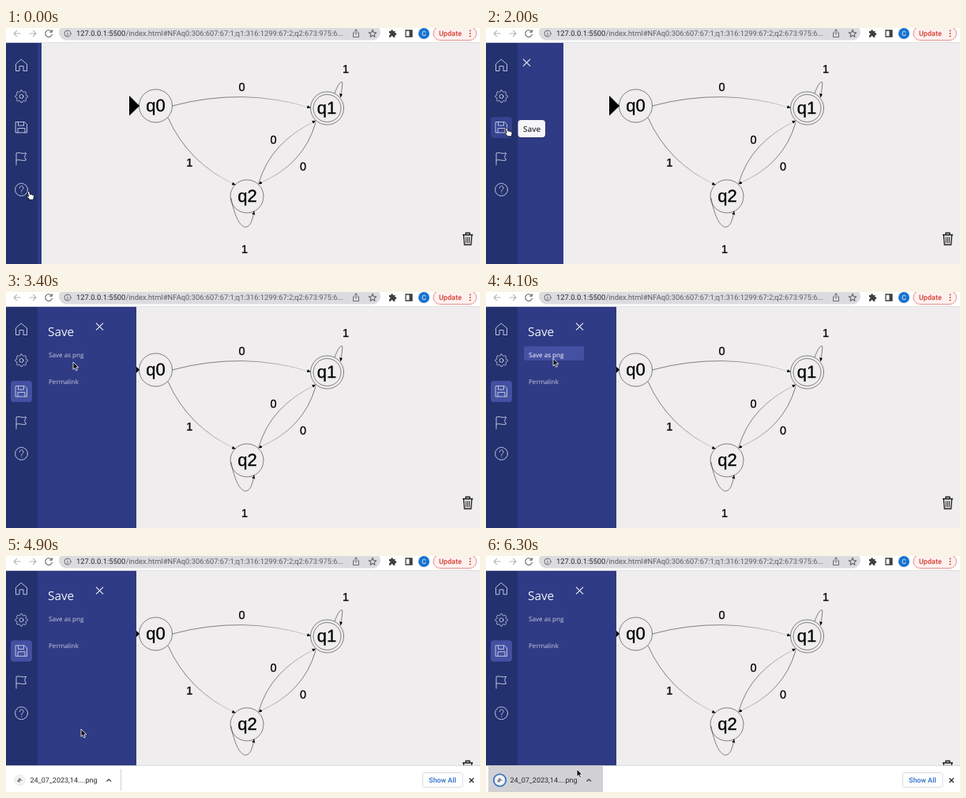
These frames come from a looping animation (600x300 px, 6400 ms). An HTML page:

```html
<!DOCTYPE html>
<html lang="en">
<head>
<meta charset="utf-8">
<title>Automaton editor: save as png</title>
<style>
  html, body { margin: 0; width: 100%; height: 100%; overflow: hidden; background: #efeded; }
  svg { display: block; width: 600px; height: 300px; text-rendering: geometricPrecision; }
  .ui { font-family: Roboto, sans-serif; }
  .graph { font-family: "Liberation Sans", Arial, sans-serif; text-anchor: middle; }
  .graph text { stroke: #000; stroke-width: .3; }
  .panel { font-family: "Open Sans", sans-serif; font-weight: 500; }
  .line { fill: none; stroke: #222; stroke-width: .55; }
  .icon { fill: none; stroke: #c0c5dc; stroke-width: 1; stroke-linecap: round; stroke-linejoin: round; }
  .tool { fill: none; stroke: #5f6368; stroke-width: 1.1; stroke-linecap: round; stroke-linejoin: round; }
</style>
</head>
<body>
<svg viewBox="0 0 600 300">
  <defs>
    <marker id="tip" viewBox="0 0 6 5" refX="5.5" refY="2.5" markerWidth="5" markerHeight="4" markerUnits="userSpaceOnUse" orient="auto">
      <path d="M0 0L6 2.5L0 5z"/>
    </marker>
    <linearGradient id="fade01" gradientUnits="userSpaceOnUse" x1="210" y1="99" x2="385" y2="101">
      <stop offset=".45" stop-color="#222"/><stop offset="1" stop-color="#bbb"/>
    </linearGradient>
    <linearGradient id="fade02" gradientUnits="userSpaceOnUse" x1="205" y1="114" x2="290" y2="199">
      <stop offset=".45" stop-color="#222"/><stop offset="1" stop-color="#bbb"/>
    </linearGradient>
    <linearGradient id="fade21" gradientUnits="userSpaceOnUse" x1="320" y1="197" x2="391" y2="118">
      <stop offset=".45" stop-color="#222"/><stop offset="1" stop-color="#aaa"/>
    </linearGradient>
    <linearGradient id="fade12" gradientUnits="userSpaceOnUse" x1="392" y1="120" x2="320" y2="198">
      <stop offset=".45" stop-color="#222"/><stop offset="1" stop-color="#aaa"/>
    </linearGradient>
  </defs>

  <rect width="600" height="300" fill="#efeded"/>

  <g class="graph">
    <path d="M156 86V111.500L169 99z"/>
    <g class="line" marker-end="url(#tip)">
      <path d="M210.500 99Q300 75 385.500 101.500" stroke="url(#fade01)"/>
      <path d="M205 114Q231 172 290.500 199.500" stroke="url(#fade02)"/>
      <path d="M320 197Q335 145 392 118" stroke="url(#fade21)"/>
      <path d="M392 120Q377 174 319.500 198" stroke="url(#fade12)"/>
      <path d="M416 83C420 72 424 67 425.500 69C426.500 73 424.500 81 423.500 88"/>
      <path d="M285 216C289 240 297 253 303 253C309 253 312 245 314 233"/>
    </g>
    <g class="line">
      <circle cx="189.500" cy="99" r="21"/>
      <circle cx="406.500" cy="102" r="21"/>
      <circle cx="406.500" cy="102" r="17.500"/>
      <circle cx="305" cy="214" r="21"/>
    </g>
    <g font-size="22">
      <text x="189.500" y="106">q0</text>
      <text x="406" y="108.500">q1</text>
      <text x="305.500" y="221">q2</text>
    </g>
    <g font-size="14.500">
      <text x="298.500" y="80">0</text>
      <text x="430" y="56.500">1</text>
      <text x="232.300" y="176">1</text>
      <text x="338.500" y="147.300">0</text>
      <text x="376" y="181.300">0</text>
      <text x="302" y="286">1</text>
    </g>
  </g>

  <g fill="none" stroke="#1d1d1d" stroke-width="1.300">
    <path d="M578 263H591M582 263V260.500H587V263M579.300 263L580.300 275.500H588.700L589.700 263"/>
    <path d="M582.300 265.500V273.500M584.500 265.500V273.500M586.700 265.500V273.500" stroke-width="1"/>
  </g>

  <g id="panel" class="panel">
    <rect x="0" y="18" width="165" height="282" fill="#2f3b84"/>
    <path d="M114 39.500L123 48.500M123 39.500L114 48.500" stroke="#d5d8e8" stroke-width="1.100"/>
    <text x="53" y="55.800" font-size="15.300" fill="#f3f4fa">Save</text>
    <rect id="hover" x="48" y="69" width="76" height="18" rx="2" fill="#4450a2"/>
    <g font-size="8.100" fill="#c9cde2">
      <text id="png" x="54" y="83">Save as png</text>
      <text x="54" y="117">Permalink</text>
    </g>
  </g>

  <rect y="18" width="40" height="282" fill="#23316f"/>
  <g id="side">
    <rect id="active" x="6" y="113" width="27" height="27" rx="4" fill="#4450a2"/>
    <g class="icon">
      <path d="M12.500 46V54.500H17V48.500H22V54.500H26.500V46L19.500 40z"/>
      <path id="gear"/>
      <circle cx="19.500" cy="87" r="2.500"/>
      <path d="M12.500 119.500H23.500L26.500 122.500V133H12.500zM15.500 119.500V124H22.500V119.500M15 133V127.500H24V133"/>
      <path d="M13 174V159C17 157.500 20 160.500 25.500 159L23.500 163.500L25.500 168C20 169.500 17 166.500 13 168"/>
      <circle cx="19.500" cy="205.500" r="8"/>
      <path d="M17.200 203.500C17.200 200 22 200 22 203.200C22 205.300 19.600 205.200 19.600 207.500M19.600 209.800V209.900"/>
    </g>
  </g>

  <g id="hint" class="panel">
    <rect x="40.500" y="118" width="35" height="22" rx="4" fill="#000" opacity=".18"/>
    <rect x="40.500" y="117" width="34.500" height="22" rx="4" fill="#f6f5f7"/>
    <text x="47" y="131.500" font-size="9.900" font-weight="600" fill="#333">Save</text>
  </g>

  <g class="ui">
    <rect width="600" height="18.500" fill="#fff"/>
    <rect x="67" y="-4" width="407" height="19.500" rx="9.700" fill="#dcdcde"/>
    <path d="M0 18.500H600" stroke="#dcdcdf" stroke-width=".8"/>
    <g class="tool">
      <path d="M18 7H10M13.500 3.500L10 7L13.500 10.500" stroke="#b4b6ba"/>
      <path d="M30 7H38M34.500 3.500L38 7L34.500 10.500" stroke="#b4b6ba"/>
      <path d="M57.500 4.500A4.300 4.300 0 1 0 58.300 8M58.300 2.500V5.300H55.500"/>
      <circle cx="78" cy="7" r="4" stroke-width=".9"/>
      <path d="M78 6.800V9.300M78 4.800V4.900" stroke-width=".9"/>
      <path d="M441 6H439.500V11.500H446.500V6H445M443 8.500V2M441 4L443 2L445 4" stroke-width=".9"/>
    </g>
    <path id="star" class="tool" stroke-width=".9"/>
    <path d="M485 4H487.200C487 1.500 490 1.500 490 4H492.500V6.500C495 6.500 495 9.200 492.500 9.200V11.800H489.800C489.800 9.500 487.200 9.500 487.200 11.800H485V9C487 9 487 6.500 485 6.500z" fill="#3c4043"/>
    <path d="M506 3H514V11H506z" fill="none" stroke="#3c4043" stroke-width="1.300"/>
    <path d="M510.500 3H514V11H510.500z" fill="#3c4043"/>
    <circle cx="529" cy="7" r="7" fill="#1a73d1"/>
    <text x="529" y="10" font-size="8.500" fill="#fff" text-anchor="middle">C</text>
    <rect x="541" y="-1.500" width="54.500" height="17" rx="8.500" fill="#fdf1f0" stroke="#e3918b" stroke-width="1"/>
    <text x="548" y="10.300" font-size="9" font-weight="500" fill="#d6392e">Update</text>
    <g fill="#d6392e"><circle cx="587.500" cy="3.500" r="1"/><circle cx="587.500" cy="7" r="1"/><circle cx="587.500" cy="10.500" r="1"/></g>
    <text x="89" y="10.300" font-size="9.400" fill="#5c5f63"><tspan fill="#25272a">127.0.0.1:5500</tspan>/index.html#NFAq0:306:607:67:1;q1:316:1299:67:2;q2:673:975:6...</text>
  </g>

  <g id="shelf" class="ui">
    <rect y="266.500" width="600" height="60" fill="#fff"/>
    <path d="M0 266.500H600" stroke="#d5d5d8" stroke-width=".8"/>
    <rect id="chipHover" x="3" y="267" width="145" height="33" fill="#d1d1d4"/>
    <path id="divider" d="M145.500 271V298" stroke="#d0d2d5"/>
    <circle cx="17.500" cy="285" r="6.500" fill="#f4f4f5" stroke="#d8dadd" stroke-width=".6"/>
    <path d="M13.800 286.500L17 281.800L21.300 286L18.500 285.300L17 288z" fill="#85888c"/>
    <circle id="ring" cx="17.500" cy="285" r="7.800" fill="none" stroke="#2b6fcb" stroke-width="1.600"/>
    <g id="file">
      <text x="30.500" y="288.300" font-size="9" fill="#2a2c2f">24_07_2023,14....png</text>
      <path d="M127.500 286.500L130.200 283.800L133 286.500" fill="none" stroke="#3c4043" stroke-width="1.300"/>
    </g>
    <rect x="527.500" y="275.500" width="50.500" height="18.500" rx="2.500" fill="#fff" stroke="#dadce0"/>
    <text x="552.500" y="288.200" font-size="8.800" font-weight="500" fill="#2968c8" text-anchor="middle">Show All</text>
    <path d="M586.500 282.500L592 288M592 282.500L586.500 288" stroke="#2a2c2f" stroke-width="1.300"/>
  </g>

  <g id="drop">
    <circle cx="22.500" cy="246" r="22.500" fill="#c9cddb"/>
    <path d="M20.800 236.500H24.200V243.500H29.500L22.500 251L15.500 243.500H20.800zM12.500 256H32.500V259H12.500z" fill="#1f66cb"/>
  </g>

  <path id="hand" d="M1.200 1C2.200 .2 3.200 1 3.400 2L3.800 4.600C4.600 4 5.500 4.300 5.700 5C6.500 4.600 7.300 5 7.500 5.600C8.400 5.300 9 5.900 9 6.800C9 8.800 8.400 9.500 8 11.300H3.300C2.600 9.600 .6 8.400 .2 7.200C0 6.300 1.200 6 2.200 7.200L.9 2.300C.7 1.700 .8 1.300 1.200 1z" fill="#fff" stroke="#111" stroke-width=".9"/>
  <path id="arrow" d="M0 0V9.500L2.200 7.600L3.700 11L5.400 10.200L3.900 6.900H6.800z" fill="#111" stroke="#fff" stroke-width=".8"/>
</svg>

<script>
const $ = id => document.getElementById(id);
const LOOP = 6400, STEP = 100;

// Cursor stops: time, x, y
const path = [
  [0, 26.5, 207], [200, 26.5, 207], [700, 26.5, 126.5], [1500, 26.5, 126.5], [1800, 24, 126.5],
  [2400, 24, 126.5], [3100, 85, 89], [3500, 85, 89], [3700, 85, 84.5], [4500, 85, 84.5],
  [4900, 95, 220], [5200, 97, 229], [5700, 115, 271], [LOOP, 115, 271]
];
const panelX = [[1870, -120], [2000, -67], [2100, -33], [2200, -12], [2300, -3], [2400, 0]];
const shelfY = [[4200, 34], [4300, 12], [4400, 2.5], [4500, 0]];
const dropFade = [[4200, 0], [4300, .6], [4400, 1], [4500, .6], [4600, 0]];
const dropY = [[4200, -10], [4400, 0], [4600, 10]];
const fileFade = [[4400, 0], [4700, 1]];

const smooth = u => u * u * (3 - 2 * u);

function track(keys, t, ease = u => u) {
  if (t <= keys[0][0]) return keys[0].slice(1);
  const i = keys.findIndex(k => k[0] > t);
  if (i < 0) return keys[keys.length - 1].slice(1);
  const a = keys[i - 1], b = keys[i];
  const u = ease((t - a[0]) / (b[0] - a[0]));
  return a.slice(1).map((v, n) => v + (b[n + 1] - v) * u);
}

function polar(cx, cy, count, radius) {
  const pts = Array.from({ length: count }, (_, i) => {
    const a = i / count * 2 * Math.PI - Math.PI / 2, r = radius(i, a);
    return (cx + r * Math.cos(a)).toFixed(2) + " " + (cy + r * Math.sin(a)).toFixed(2);
  });
  return "M" + pts.join("L") + "z";
}

$("gear").setAttribute("d", polar(19.5, 87, 96, (i, a) => 6.9 + Math.max(-.8, Math.min(.9, 1.4 * Math.cos(8 * a)))));
$("star").setAttribute("d", polar(464, 7.3, 10, i => i % 2 ? 2.2 : 5));

const move = (id, x, y) => $(id).setAttribute("transform", `translate(${x} ${y})`);
const fade = (id, v) => $(id).setAttribute("opacity", v);
const show = (id, on) => fade(id, on ? 1 : 0);

function draw(t) {
  const [x, y] = track(path, t, smooth);
  const pointing = x < 36;
  move("hand", x, y);
  move("arrow", x, y);
  show("hand", pointing);
  show("arrow", !pointing);

  move("panel", track(panelX, t)[0], 0);
  move("side", 0, t >= 4300 ? -5.7 : 0);
  show("active", t >= 1700);
  $("active").setAttribute("fill", t < 2100 ? "#35428f" : "#4450a2");
  show("hint", t >= 1800 && t < 2500);

  const over = t >= 3600 && t < 4600;
  show("hover", over);
  $("png").setAttribute("fill", over ? "#fff" : "#c9cde2");

  move("shelf", 0, track(shelfY, t)[0]);
  show("shelf", t > 4200);
  const [shown] = track(fileFade, t);
  fade("file", shown);
  fade("divider", shown);
  show("chipHover", t >= 5600);
  fade("ring", (1 + Math.cos((t - 4400) / 950 * 2 * Math.PI)) / 2);

  move("drop", 0, track(dropY, t)[0]);
  fade("drop", track(dropFade, t)[0]);
}

const start = performance.now();
function tick() {
  const t = (performance.now() - start) % LOOP;
  draw(Math.floor(t / STEP) * STEP);
  requestAnimationFrame(tick);
}
tick();
</script>
</body>
</html>
```
